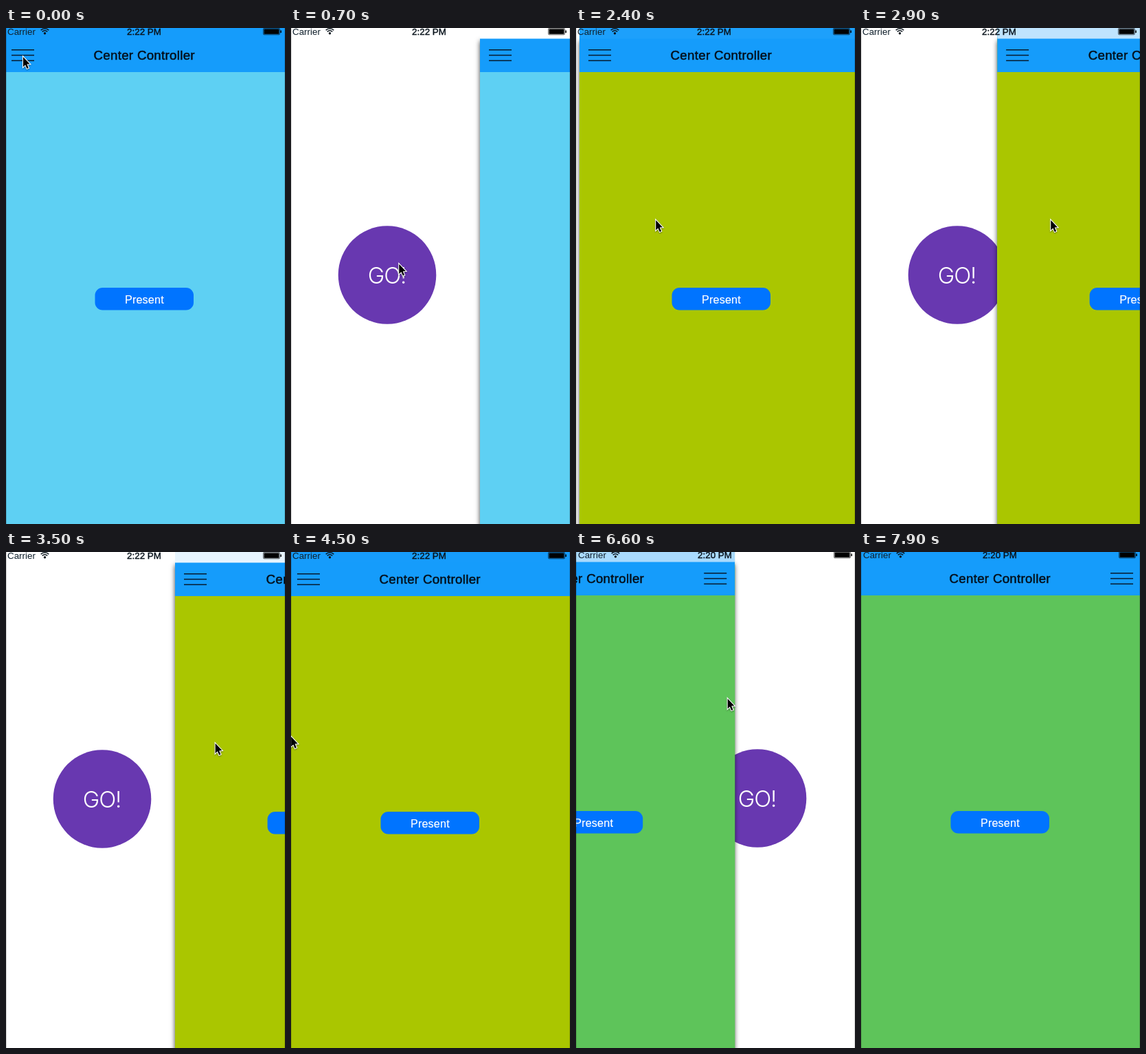
Write an HTML page with a canvas that moves like this. It is 406 by 720 pixels and loops after 8 s.

```html
<!DOCTYPE html>
<html lang="en">
<head>
<meta charset="utf-8">
<title>Drawer demo</title>
<style>
html, body { margin: 0; width: 100%; height: 100%; overflow: hidden; background: #fff; }
canvas { display: block; width: 406px; height: 720px; }
</style>
</head>
<body>
<canvas id="stage" width="406" height="720"></canvas>
<script>
const ctx = document.getElementById('stage').getContext('2d');
const LOOP = 8000, CUT = 4700, OPEN = 280;
const SANS = '"Liberation Sans", Arial, sans-serif';
const LIGHT = 'Inter, Roboto, sans-serif';
const CYAN = '#5ed0f3', OLIVE = '#aac600', GREEN = '#5ec45a', INK = '#071a2c';

// Progress from 0 to 1 between two times, even or eased
const ramp = (t, from, to) => Math.min(1, Math.max(0, (t - from) / (to - from)));
const ease = (t, from, to) => {
  const p = ramp(t, from, to);
  return p * p * (3 - 2 * p);
};

// A drag pulls the drawer open, then pushes it shut more slowly
const drag = (t, start) => ({
  pull: ramp(t, start, start + 725),
  push: ramp(t, start + 1010, start + 2130)
});

function leftDemo(t) {
  const tap = ease(t, 150, 450) - ease(t, 850, 1130);
  const toGo = ease(t, 250, 750), away = ease(t, 1500, 2300);
  const { pull, push } = drag(t, 2375);
  return {
    shift: OPEN * (tap + pull - push),
    x: 24 + 136 * toGo - 53 * away + 232 * pull - 341 * push,
    y: 41 + 309 * toGo - 72 * away + push * -11
  };
}

function rightDemo(t) {
  const { pull, push } = drag(t, 5178);
  return {
    shift: OPEN * (push - pull),
    x: 326 - 232 * pull + 341 * push,
    y: 212
  };
}

function rect(x, y, w, h, color) {
  ctx.fillStyle = color;
  ctx.fillRect(x, y, w, h);
}

function disc(x, y, r, color) {
  ctx.fillStyle = color;
  ctx.beginPath();
  ctx.arc(x, y, r, 0, 7);
  ctx.fill();
}

function label(text, x, y, font, color, { align = 'center', weight = 0, spacing = 0 } = {}) {
  ctx.font = font;
  ctx.textAlign = align;
  ctx.letterSpacing = spacing + 'px';
  ctx.fillStyle = ctx.strokeStyle = color;
  ctx.fillText(text, x, y);
  if (weight) {
    ctx.lineWidth = weight;
    ctx.strokeText(text, x, y);
  }
}

function drawer(x) {
  disc(x, 358.5, 71.3, '#6838b0');
  label('GO!', x - 0.5, 371, '300 33px ' + LIGHT, '#fff', { spacing: -1.2 });
}

function panel(shift, color, radius, menuX) {
  ctx.save();
  ctx.translate(shift, 0);
  ctx.save();
  ctx.shadowColor = 'rgba(0,0,0,.75)';
  ctx.shadowBlur = 7;
  rect(-5, 19, 412, 720, color);
  ctx.restore();
  ctx.beginPath();
  ctx.rect(-5, -2, 412, 724);
  ctx.clip();
  rect(-5, -2, 412, 724, color);
  if (radius > 0) disc(201, 380, radius, OLIVE);
  rect(-5, -2, 412, 66, '#159cfb');
  label('Center Controller', 201.2, 46, '18.7px ' + SANS, '#04101c', { weight: 0.5, spacing: 0.3 });
  for (let i = 0; i < 3; i++) rect(menuX, 31 + 7.8 * i, 33, 1.5, INK);
  ctx.fillStyle = '#0074ff';
  ctx.beginPath();
  ctx.roundRect(129.5, 377, 143.5, 32.5, 11);
  ctx.fill();
  label('Present', 201.4, 399.5, '16.2px ' + SANS, '#fff', { weight: 0.2, spacing: 0.15 });
  rect(-5, -2, 412, 17.5, `rgba(255,255,255,${Math.abs(shift) / OPEN})`);
  ctx.restore();
}

function statusBar(time) {
  label('Carrier', 2, 9.5, '13.4px ' + SANS, '#10202c', { align: 'left' });
  label(time, 201, 9.5, '13.4px ' + SANS, '#0a141c', { weight: 0.4 });
  ctx.lineWidth = 1.6;
  ctx.strokeStyle = '#0a141c';
  for (const r of [5.2, 8.2]) {
    ctx.beginPath();
    ctx.arc(56.5, 9, r, -Math.PI * 0.75, -Math.PI * 0.25);
    ctx.stroke();
  }
  disc(56.5, 7.8, 1.7, '#0a141c');
  ctx.strokeStyle = 'rgba(0,0,0,.75)';
  ctx.lineWidth = 0.8;
  ctx.beginPath();
  ctx.roundRect(374.4, 0.4, 24, 9.4, 1.5);
  ctx.stroke();
  rect(375.4, 1.4, 22, 7.4, '#000');
  rect(399.3, 3.5, 1.5, 3.5, '#000');
}

const ARROW = new Path2D('M0.5 0V16L4 12.7 6.7 18.8 9.2 17.7 6.6 11.7 11.3 11.4Z');

function cursor(x, y) {
  ctx.save();
  ctx.translate(x + 0.5, y + 1);
  ctx.scale(0.9, 0.9);
  ctx.shadowColor = 'rgba(0,0,0,.4)';
  ctx.shadowBlur = 2;
  ctx.shadowOffsetY = 1;
  ctx.lineWidth = 2.4;
  ctx.strokeStyle = '#fff';
  ctx.stroke(ARROW);
  ctx.shadowColor = 'transparent';
  ctx.fillStyle = '#000';
  ctx.fill(ARROW);
  ctx.restore();
}

function draw(t) {
  const second = t >= CUT;
  const { shift, x, y } = second ? rightDemo(t) : leftDemo(t);
  const radius = second ? 0 : 420 * ramp(t, 1100, 1504);
  rect(0, 0, 406, 720, '#fff');
  ctx.save();
  if (second) ctx.translate(1, -1);
  drawer(second ? 263 : 140);
  panel(shift, second ? GREEN : CYAN, radius, second ? 362 : 8);
  statusBar(second ? '2:20 PM' : '2:22 PM');
  ctx.restore();
  for (const edge of [0, 405]) rect(edge, 0, 1, 720, 'rgba(0,0,0,.18)');
  cursor(x, y);
}

const start = performance.now();
function tick() {
  draw((performance.now() - start) % LOOP);
  requestAnimationFrame(tick);
}
tick();
</script>
</body>
</html>
```
